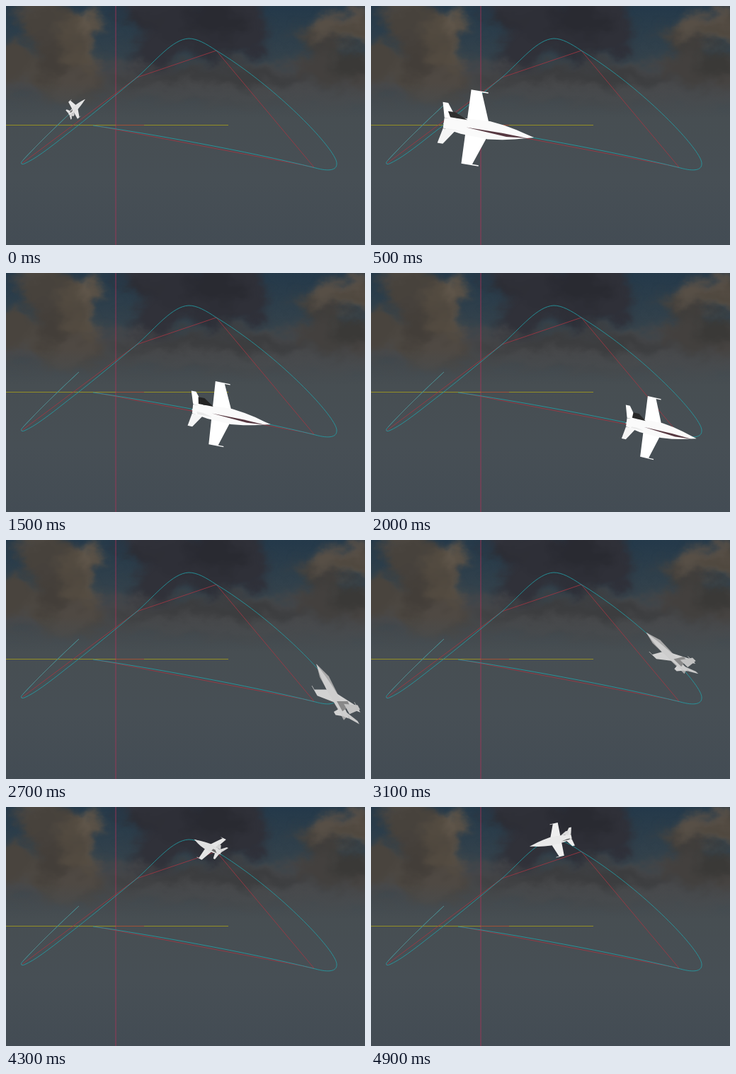
Write an HTML page that moves like this. It is 507 by 338 pixels and loops after 5000 ms.

```html
<!DOCTYPE html>
<html lang="en">
<head>
<meta charset="utf-8">
<title>Jet on a spline</title>
<style>
html, body { margin: 0; width: 100%; height: 100%; overflow: hidden; background: #454d54; }
svg { display: block; width: 100vw; height: 100vh; }
.line { fill: none; stroke-width: 1; stroke-opacity: .82; }
</style>
</head>
<body>
<svg viewBox="0 0 507 338" preserveAspectRatio="none">
  <defs>
    <linearGradient id="sky" x1="0" y1="0" x2="0" y2="1">
      <stop offset="0" stop-color="#24394a"/>
      <stop offset=".5" stop-color="#37444c"/>
      <stop offset="1" stop-color="#454b50"/>
    </linearGradient>
    <linearGradient id="haze" x1="0" y1="0" x2="0" y2="1">
      <stop offset="0" stop-color="#454b4f" stop-opacity="0"/>
      <stop offset=".22" stop-color="#474e52"/>
      <stop offset=".6" stop-color="#474f55"/>
      <stop offset="1" stop-color="#434c54"/>
    </linearGradient>
    <filter id="puff" filterUnits="userSpaceOnUse" x="-60" y="-60" width="630" height="300" color-interpolation-filters="sRGB">
      <feGaussianBlur in="SourceGraphic" stdDeviation="7" result="soft"/>
      <feTurbulence type="fractalNoise" baseFrequency=".025 .035" numOctaves="4" seed="4" result="noise"/>
      <feDisplacementMap in="soft" in2="noise" scale="38" xChannelSelector="R" yChannelSelector="G"/>
    </filter>
  </defs>
  <rect width="507" height="180" fill="url(#sky)"/>
  <g id="clouds" filter="url(#puff)"></g>
  <rect y="108" width="507" height="230" fill="url(#haze)"/>

  <path class="line" stroke="#a93458" d="M155 0V338"/>
  <path class="line" stroke="#a59d1d" d="M0 168.5H314"/>
  <path class="line" stroke="#a2453a" d="M155 168.5H195"/>
  <path class="line" stroke="#a53643" d="M125 169L435 228L297 63L185 101L22 223"/>
  <path class="line" stroke="#23a0a8" id="route" d="M123 169C200 180 340 205 437 229C455 234 468 233 467 222C466 206 410 144 340 92C325 81 312 72 297 63C282 53 270 46 258 46C235 47 212 77 185 101C150 130 115 159 85 182C60 202 40 217 26 223C21 225 20 222 24 218C45 195 75 166 103 140"/>
  <path class="line" stroke="#5d8688" d="M24 218C45 195 75 166 103 140"/>
  <g id="jet"></g>
</svg>
<script>
const LOOP = 5000, STEP = 100, RESTART = 300;
const HALF_SPAN = .405;
const $ = id => document.getElementById(id);
const { sin, cos, atan2, min, max, abs } = Math;

function add(parent, tag, attrs = {}) {
  const el = document.createElementNS('http://www.w3.org/2000/svg', tag);
  for (const k in attrs) el.setAttribute(k, attrs[k]);
  return parent.appendChild(el);
}

// Clouds: a low grey bank, then a few large masses, all of random puffs
let seed = 7;
const rand = () => (seed = seed * 16807 % 2147483647) / 2147483647;

function cloud(x, y, w, h, count, [r, g, b]) {
  for (let i = 0; i < count; i++) {
    const k = .9 + rand() * .2;
    add($('clouds'), 'ellipse', {
      cx: x + (rand() - .5) * w, cy: y + (rand() - .5) * h,
      rx: w * .2 + rand() * 12, ry: h * .2 + rand() * 8,
      fill: `rgb(${r * k},${g * k},${b * k})`
    });
  }
}
cloud(253, 112, 560, 46, 26, [66, 67, 69]);
cloud(45, 62, 120, 110, 16, [74, 69, 63]);
cloud(108, 50, 44, 70, 9, [90, 81, 70]);
cloud(270, 30, 150, 80, 22, [45, 46, 54]);
cloud(465, 72, 100, 70, 12, [64, 62, 60]);
cloud(468, 28, 74, 34, 10, [84, 76, 67]);

// Jet outline: x along the length, y in half spans to the right, z up
const wing = [[-.01, .2], [-.13, 1], [-.06, 1], [-.06, 1.03], [-.25, 1.03], [-.25, .2]];
const stab = [[-.36, .15], [-.48, .57], [-.54, .57], [-.5, .15]];
const fin = [[-.25, .17, .03], [-.41, .24, .18], [-.49, .24, .18], [-.44, .17, .03]];
const half = [[.5, 0], [.42, .05], [.3, .13], [.16, .2], [0, .25], [-.3, .22], [-.5, .14]];
const side = [[.5, 0], [.2, 0, .07], [-.5, 0, .04], [-.5, 0, -.05], [.3, 0, -.05]];
const stripe = [[.43, .05], [.2, .1], [-.25, .02], [.15, .02]];
const mirror = pts => pts.map(([x, y, z]) => [x, -y, z]);
const hull = half.concat(mirror(half).reverse());

const grey = v => `rgb(${v},${v},${v})`;
const lit = k => roll => grey(k * (255 - 50 * max(0, sin(roll))));
const parts = [
  [side, lit(.8)],
  [mirror(stab), lit(1)], [stab, lit(.96)],
  [mirror(wing), lit(1)], [wing, lit(1)],
  [hull, lit(.98)],
  [stripe, roll => `rgba(70,36,46,${max(0, min(.9, -4 * roll))})`],
  [mirror(fin), roll => grey(65 + 80 * sin(roll))], [fin, lit(.92)]
].map(([pts, paint]) => ({ pts, paint, el: add($('jet'), 'polygon') }));

// time, distance along the route, length in px, pitch away from the viewer, roll
const keys = [
  [300, 0, 132, .1, -.22],
  [1000, 83, 124, .15, -.25],
  [2000, 275, 108, .35, -.3],
  [2700, 352, 110, .66, 1.1],
  [3500, 499, 82, .6, .95],
  [4300, 599, 58, .76, .55],
  [4900, 629, 61, .1, .35]
];
const route = $('route'), total = route.getTotalLength();

function slope(i, n) {
  const a = keys[max(0, i - 1)], b = keys[min(keys.length - 1, i + 1)];
  return (b[n] - a[n]) / (b[0] - a[0]);
}

// Smooth cubic through the keys; the last stretch of the route comes first
function flight(t) {
  if (t < RESTART) return [total - 9 + t * .02, 36, .5, .5];
  let i = 0;
  while (i < keys.length - 2 && t >= keys[i + 1][0]) i++;
  const a = keys[i], b = keys[i + 1], d = b[0] - a[0], u = (t - a[0]) / d;
  return [1, 2, 3, 4].map(n => {
    const m0 = slope(i, n) * d, m1 = slope(i + 1, n) * d, rise = b[n] - a[n];
    return a[n] + u * (m0 + u * (3 * rise - 2 * m0 - m1 + u * (m0 + m1 - 2 * rise)));
  });
}

function draw(t) {
  const [dist, size, pitch, roll] = flight(t);
  const at = route.getPointAtLength(dist);
  const ahead = route.getPointAtLength(min(total, dist + size * .4));
  const heading = atan2(ahead.y - at.y, ahead.x - at.x);
  const c = cos(heading), s = sin(heading);

  // Local axes as (along heading, across heading) on the stage
  const fwd = cos(pitch);
  const right = [-sin(pitch) * sin(roll), cos(roll)];
  const up = [sin(pitch) * cos(roll), sin(roll)];
  const project = ([x, y, z = 0]) => {
    const along = size * ((x + .17) * fwd + y * HALF_SPAN * right[0] + z * up[0]);
    const across = size * (y * HALF_SPAN * right[1] + z * up[1]);
    return (at.x + along * c - across * s).toFixed(2) + ',' + (at.y + along * s + across * c).toFixed(2);
  };
  for (const { pts, paint, el } of parts) {
    el.setAttribute('points', pts.map(project).join(' '));
    el.setAttribute('fill', paint(roll));
  }
}

const start = performance.now();
function tick() {
  const t = max(0, performance.now() - start) % LOOP;
  draw(Math.floor(t / STEP) * STEP);
  requestAnimationFrame(tick);
}
tick();
</script>
</body>
</html>
```
